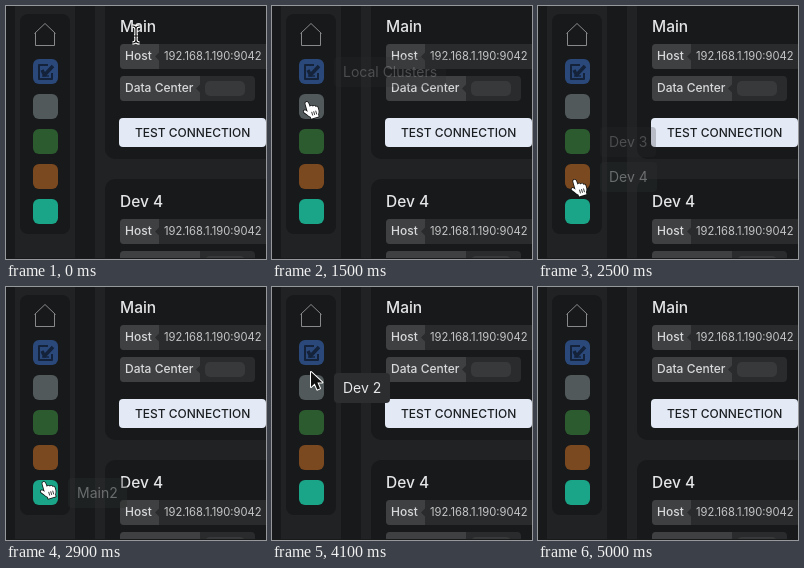
Recreate the animation shown at these times as an HTML page with a canvas. Size 260 by 253 pixels, loop 5700 ms.

```html
<!DOCTYPE html>
<html lang="en">
<head>
<meta charset="utf-8">
<title>Workspace sidebar</title>
<style>
html, body { margin: 0; width: 100%; height: 100%; overflow: hidden; background: #212223; }
canvas { display: block; width: 260px; height: 253px; }
</style>
</head>
<body>
<canvas id="stage"></canvas>
<script>
const W = 260, H = 253, LOOP = 5700, STEP = 100, GONE = 5000;
const PITCH = 35, FADE = 0.38;
const DARK = '#17191a', PAGE = '#212223', CHIP = '#2a2b2c', LABEL = '#3f4041';

const canvas = document.getElementById('stage');
const ratio = window.devicePixelRatio || 1;
canvas.width = W * ratio;
canvas.height = H * ratio;
const ctx = canvas.getContext('2d');
ctx.scale(ratio, ratio);

// Sidebar entries from top to bottom; the first is the house.
const ENTRIES = [
  { name: 'Workspaces' },
  { name: 'Local Clusters', color: '#2a4879' },
  { name: 'Dev 2', color: '#51595b' },
  { name: 'Dev 3', color: '#2c5b30' },
  { name: 'Dev 4', color: '#7b4920' },
  { name: 'Main2', color: '#1aa588' }
];

// Key points of the pointer: time, x, y
const PATH = [
  [0, 130, 28], [300, 33, 32], [800, 32, 32], [900, 33, 48],
  [1500, 38, 96], [1700, 38, 102], [1900, 38, 126], [2100, 39, 133],
  [2600, 40, 184], [2800, 41, 195], [3200, 41, 195], [3800, 40, 112],
  [4100, 39, 84], [4250, 40, 72], [4600, 40, 72], [GONE, 52, -24]
];

const clamp = v => Math.max(0, Math.min(1, v));

function pointerAt(t) {
  const i = PATH.findIndex(p => p[0] > t);
  if (i < 0) return null;
  const [ta, xa, ya] = PATH[i - 1], [tb, xb, yb] = PATH[i];
  const k = (t - ta) / (tb - ta);
  return { x: xa + (xb - xa) * k, y: ya + (yb - ya) * k };
}

function hovered(t) {
  const p = pointerAt(t);
  if (!p || p.x < 27 || p.x > 52) return -1;
  return ENTRIES.findIndex((e, i) => Math.abs(p.y - 30.5 - PITCH * i) <= 11.5);
}

// Opacity of a tooltip: it grows while its entry is hovered, else shrinks.
function tipAlpha(i, t) {
  let alpha = 0;
  for (let s = 0; s < t; s += STEP) {
    alpha = clamp(alpha + (hovered(s) === i ? FADE : -FADE));
  }
  return alpha;
}

function box(x, y, w, h, r, fill) {
  ctx.beginPath();
  ctx.roundRect(x, y, w, h, r);
  ctx.fillStyle = fill;
  ctx.fill();
}

function text(str, x, y, size, color, weight = 400) {
  ctx.font = `${weight} ${size}px Inter, sans-serif`;
  ctx.fillStyle = color;
  ctx.fillText(str, x, y);
}

function outline(d, fill, stroke, width) {
  const p = new Path2D(d);
  ctx.lineWidth = width;
  ctx.lineJoin = 'round';
  ctx.strokeStyle = stroke;
  ctx.stroke(p);
  if (fill) {
    ctx.fillStyle = fill;
    ctx.fill(p);
  }
}

function chip(label, y, split, right) {
  box(114, y, right - 114, 25, 4, CHIP);
  box(114, y, split - 114, 25, [4, 0, 0, 4], LABEL);
  ctx.beginPath();
  ctx.moveTo(split, y + 8.5);
  ctx.lineTo(split - 4, y + 12.5);
  ctx.lineTo(split, y + 16.5);
  ctx.fillStyle = CHIP;
  ctx.fill();
  text(label, 119, y + 16, 12, '#d8d9da', 500);
}

function card(title, y, top) {
  box(99, y + top, 180, 153 - top, 10, DARK);
  text(title, 114, y + 26, 15.5, '#e4e5e6', 500);
  chip('Host', y + 38, 153, 280);
  text('192.168.1.190:9042', 158, y + 54, 11.2, '#c4c5c6');
  chip('Data Center', y + 70, 194, 249);
  box(199, y + 75, 40, 15, 5, '#38393a');
  box(113, y + 112, 147, 29, 4, '#e3eaf6');
  text('TEST CONNECTION', 129, y + 131, 12, '#1c1f22', 500);
}

function sidebar() {
  box(14, 8, 50, 220, 8, DARK);
  outline('M28.5 27.5L39 17.5L49.5 27.5M29.5 27V39.5H48.5V27', null, '#88898a', 1);
  ENTRIES.forEach(({ color }, i) => {
    if (color) box(27, 18 + PITCH * i, 25, 25, 6, color);
  });
  const ink = '#14223a';
  outline('M42 59H33V73H46V67', null, ink, 2);
  outline('M36 64L38.5 69L47 60', null, ink, 3.4);
  outline('M36 70H43', null, ink, 1.4);
}

function scene() {
  ctx.fillStyle = PAGE;
  ctx.fillRect(0, 0, W, H);
  ctx.fillStyle = DARK;
  ctx.fillRect(0, 0, 9, H);
  ctx.fillRect(69, 0, 20, H);
  sidebar();
  card('Main', 0, -20);
  card('Dev 4', 175, -2);
  ctx.fillStyle = DARK;
  ctx.fillRect(0, 252, W, 1);
}

function tip(name, y, alpha) {
  if (alpha <= 0) return;
  ctx.globalAlpha = alpha;
  ctx.font = '400 14px Inter, sans-serif';
  box(62, y, Math.round(ctx.measureText(name).width) + 18, 30, 4, '#2c2d2e');
  text(name, 71, y + 20, 14, '#e6e7e8');
  ctx.globalAlpha = 1;
}

const CURSORS = {
  beam() {
    const d = 'M-3.5 -8Q0 -8 0 -5Q0 -8 3.5 -8M0 -5V6M-3.5 9Q0 9 0 6Q0 9 3.5 9M-2 2H2';
    outline(d, null, '#fff', 3.4);
    outline(d, null, '#111', 1.2);
  },
  arrow() {
    outline('M0 1V16L3.7 12.6L6.3 18.6L9 17.4L6.4 11.6H11.4Z', '#111', '#fff', 2);
  },
  hand() {
    ctx.translate(-3.5, -0.5);
    ctx.rotate(-0.28);
    ctx.scale(0.95, 0.95);
    outline('M-1.8 11V2Q-1.8 .5 -.2 .5Q1.2 .5 1.4 2L1.8 6.6Q2.2 5.4 3.6 5.6Q4.8 5.8 5 7.2' +
      'Q5.6 6.2 6.7 6.6Q7.6 7 7.6 8.2Q9.6 7.6 9.6 9.8V12.5Q9.4 14.5 8 16.5V18.8H-.2V17' +
      'Q-2.4 14.8 -3.4 13L-5.6 10.2Q-6 8.8 -4.8 8.4Q-3.4 8.2 -1.8 11Z', '#fff', '#111', 1.6);
    outline('M2.2 12V16M4.4 12V16M6.6 12V16', null, '#111', 0.8);
  }
};

function pointer(t) {
  const p = pointerAt(t);
  if (!p) return;
  const kind = t < STEP ? 'beam' : hovered(t) >= 0 ? 'hand' : 'arrow';
  ctx.save();
  ctx.translate(p.x, p.y);
  CURSORS[kind]();
  ctx.restore();
}

const start = performance.now();

function draw() {
  const t = Math.floor((performance.now() - start) % LOOP / STEP) * STEP;
  scene();
  ENTRIES.forEach(({ name }, i) => tip(name, 16 + PITCH * i, tipAlpha(i, t)));
  pointer(t);
  requestAnimationFrame(draw);
}
draw();
</script>
</body>
</html>
```
